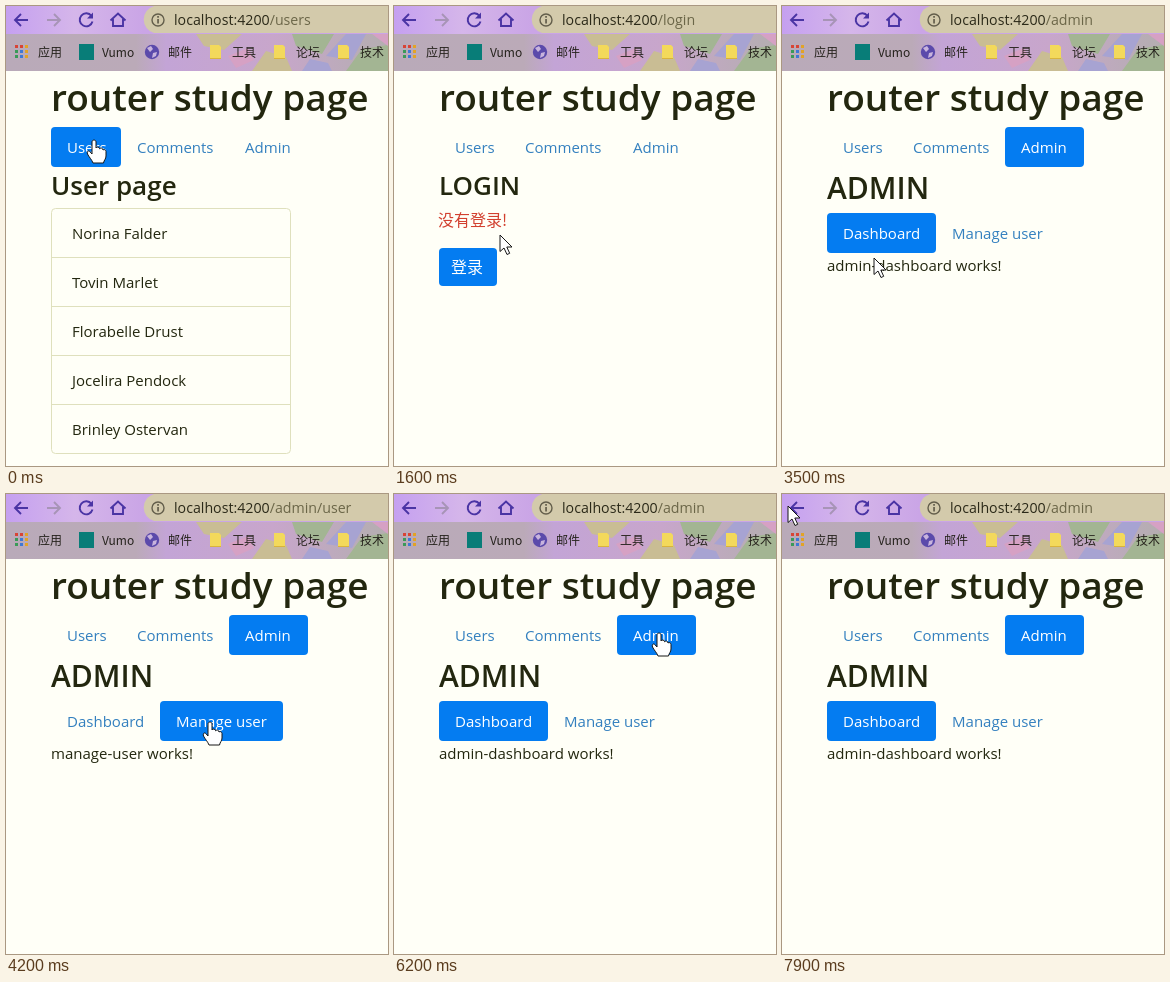
An HTML page for the animation above (8000 ms loop, 382 px wide and 460 px high).

```html
<!DOCTYPE html>
<html lang="en">
<head>
<meta charset="utf-8">
<title>router study page</title>
<style>
html, body { margin: 0; width: 100%; height: 100%; overflow: hidden; background: #fffff7; }
svg { display: block; width: 100vw; height: 100vh; }
text { font: 15px "Open Sans", "Noto Sans CJK SC", "Noto Sans CJK", sans-serif; fill: #23270f; white-space: pre; }
.h1 { font-size: 37px; font-weight: 600; }
.h2 { font-size: 30px; font-weight: 600; }
.h3 { font-size: 26px; font-weight: 600; }
.url { font-size: 14.2px; fill: #6b6648; }
.url .host { fill: #2b2918; }
.mark { font: 12px "Noto Sans CJK SC", "Noto Sans CJK", "Open Sans", sans-serif; fill: #25221c; }
.cn { font-size: 16px; font-family: "Noto Sans CJK SC", "Noto Sans CJK", sans-serif; }
.red { fill: #d2402f; }
.link { fill: #3480bf; }
.link.hover { fill: #17568f; }
.on { fill: #fff; }
.pill { fill: #047cf1; }
.line { fill: none; stroke: #dfe0bd; }
.icon { fill: none; stroke: #4a34a4; stroke-width: 1.9; }
</style>
</head>
<body>
<svg viewBox="0 0 382 460" preserveAspectRatio="none">
  <defs>
    <linearGradient id="top"><stop offset="0" stop-color="#c5a0f0"/><stop offset=".18" stop-color="#d5b6ea"/><stop offset=".36" stop-color="#caa5e6"/></linearGradient>
    <linearGradient id="bar"><stop offset="0" stop-color="#b9aab9"/><stop offset=".34" stop-color="#bbaab8"/><stop offset=".42" stop-color="#c3a4d6"/><stop offset=".7" stop-color="#c8a6cb"/><stop offset="1" stop-color="#b4aeb0"/></linearGradient>
  </defs>
  <rect width="382" height="460" fill="#fffff7"/>
  <g id="chrome">
    <rect width="382" height="30" fill="url(#top)"/>
    <rect y="28" width="382" height="37" fill="url(#bar)"/>
    <path d="M190 28h46l-18 16-20-4zM246 65l14-20 20 6 6 14z" fill="#c9bd94"/>
    <path d="M286 28h42l-12 20-26-8zM340 65l16-22 26-4v26z" fill="#a3b593"/>
    <path d="M320 50l20-22h20l-14 26zM296 65l8-12 18 4 4 8z" fill="#a7a3d2"/>
    <path d="M366 28h16v12zM222 50l20-8 6 12-18 8z" fill="#d6a1c4"/>
    <path d="M382 0H148a14 14 0 0 0 0 27H382z" fill="#d3caab"/>
    <path class="icon" d="M22 14H9.500M15 8L9 14l6 6"/>
    <path class="icon" d="M41 14h12.500M48 8l6 6-6 6" style="stroke:#a794b6"/>
    <path class="icon" d="M85.500 10A6.500 6.500 0 1 0 86.500 15.500"/>
    <path d="M87 6.500v6h-6z" fill="#4a34a4"/>
    <path class="icon" d="M104.500 14.500l7.500-7 7.500 7M107 13v7h10v-7"/>
    <circle class="icon" cx="152" cy="14" r="6" style="stroke:#635e4b;stroke-width:1.400"/>
    <path d="M151.200 10h1.700v1.700h-1.700zM151.200 13h1.700v4.500h-1.700z" fill="#635e4b"/>
    <rect x="73" y="38" width="15" height="16" fill="#087d78"/>
    <circle cx="146" cy="46" r="7.200" fill="#5b4aab"/>
    <path d="M141 42l4-2 2 3-3 3zM147 47l4-1-1 4-4 2z" fill="#c8b4dd"/>
  </g>
  <text class="url" x="168" y="19"><tspan class="host">localhost:4200</tspan><tspan id="path"></tspan></text>
  <text class="h1" x="45" y="105">router study page</text>
  <g id="page"></g>
  <g id="cursor" stroke-linejoin="round">
    <path id="arrow" d="M0 0V16.500L4 13l3 6.500 2.700-1.200L6.800 12H12z" fill="#fff" stroke="#161616"/>
    <path id="hand" d="M-2 1.500C-2-.7 2-.7 2 1.500V8C3-.2+8 6 7.500 6 9C7 7.300 9.300 8 9.300 10C10.300 9 12 9.700 12 11.500V16C12 19 10 20 9.500 23H-1C-2 20-5 17-7 13.500C-8 11-5 10-3.800 12L-2 14z" fill="#fff" stroke="#161616"/>
  </g>
</svg>
<script>
const $ = id => document.getElementById(id);
const LOOP = 8000, STEP = 100;

const nav = [["Users", 45, 70], ["Comments", 115, 108], ["Admin", 223, 79]];
const sub = [["Dashboard", 45, 109], ["Manage user", 154, 123]];
const people = ["Norina Falder", "Tovin Marlet", "Florabelle Drust", "Jocelira Pendock", "Brinley Ostervan"];
const notes = ["id labore ex et quam laborum", "quo vero reiciendis velit similique earum",
  "odio adipisci rerum aut animi", "alias odio sit", "vero eaque aliquid doloribus et culpa"];

const views = {
  users: { path: "/users", tab: 0, body: () => list("User page", people, 240) },
  comments: { path: "/comments", tab: 1, body: () => list("Comment page", notes, 400) },
  login: { path: "/login", tab: -1, body: p => login("没有登录!", false, p) },
  wait: { path: "/login", tab: -1, body: p => login("登录中 ...", true, p) },
  admin: { path: "/admin", tab: 2, body: p => admin(0, "admin-dashboard works!", p) },
  manage: { path: "/admin/user", tab: 2, body: p => admin(1, "manage-user works!", p) }
};

// [time, view]
const route = [[0, "users"], [700, "login"], [2600, "wait"], [3500, "admin"], [4100, "manage"],
  [4800, "comments"], [5400, "users"], [6200, "admin"], [6700, "manage"], [7100, "admin"]];

// [time, x, y] of the pointer tip
const track = [[0, 88, 134], [100, 88, 134], [600, 262, 141], [900, 262, 141], [1600, 106, 229],
  [1900, 106, 229], [2400, 92, 252], [3500, 92, 252], [4000, 204, 228], [4300, 204, 228],
  [4700, 168, 143], [4900, 168, 143], [5300, 101, 146], [5400, 92, 144], [5600, 92, 144],
  [6000, 265, 139], [6400, 265, 139], [6650, 220, 230], [6800, 220, 230], [7050, 102, 230],
  [7300, 102, 230], [7900, 6, 12], [8000, 6, 12]];

const text = (s, x, y, cls = "") => `<text class="${cls}" x="${x}" y="${y}">${s}</text>`;
const box = (x, y, w, h, attr) => `<rect x="${x}" y="${y}" width="${w}" height="${h}" rx="4" ${attr}/>`;
const inside = ([px, py], x, y, w, h) => px >= x && px < x + w && py >= y && py < y + h;

function pills(items, y, active, p) {
  return items.map(([label, x, w], i) => {
    const on = i === active;
    const cls = on ? "on" : inside(p, x, y, w, 40) ? "link hover" : "link";
    return (on ? box(x, y, w, 40, 'class="pill"') : "") + text(label, x + 16, y + 26, cls);
  }).join("");
}

function list(title, rows, w) {
  let out = text(title, 45, 189, "h3") + box(45.5, 202.5, w - 1, 245, 'class="line"');
  rows.forEach((row, i) => {
    const y = 202.5 + i * 49;
    if (i) out += `<path class="line" d="M45 ${y}h${w}"/>`;
    out += text(row, 66, 233 + i * 49);
  });
  return out;
}

function login(message, busy, p) {
  const dark = busy || inside(p, 45, 242, 58, 38);
  return text("LOGIN", 45, 189, "h3") + text(message, 44, 220, "cn red") +
    (busy ? box(42.5, 239.5, 63, 43, 'fill="#98d2ee"') : "") +
    box(45, 242, 58, 38, `fill="${dark ? "#0670b4" : "#047cf1"}"`) + text("登录", 57, 267, "cn on");
}

function admin(active, message, p) {
  return text("ADMIN", 45, 193, "h2") + pills(sub, 207, active, p) + text(message, 45, 265);
}

function pointer(t) {
  const i = track.findIndex(k => k[0] > t);
  const [t0, x0, y0] = track[i - 1], [t1, x1, y1] = track[i];
  const u = (t - t0) / (t1 - t0), e = u * u * (3 - 2 * u);
  return [x0 + (x1 - x0) * e, y0 + (y1 - y0) * e].map(Math.round);
}

function overLink(name, p) {
  const hit = (items, y) => items.some(([, x, w]) => inside(p, x, y, w, 40));
  if (hit(nav, 121)) return true;
  if (views[name].tab === 2) return hit(sub, 207);
  return views[name].tab < 0 && inside(p, 45, 242, 58, 38);
}

function bookmarks() {
  const labels = [["应用", 32], ["Vumo", 96], ["邮件", 162], ["工具", 226], ["论坛", 290], ["技术", 354]];
  const dots = ["#d84436", "#d84436", "#e2a326", "#3b9a58", "#3f78d5", "#e2a326", "#3b9a58", "#3f78d5", "#e2a326"];
  let out = labels.map(([s, x]) => text(s, x, 51, "mark")).join("");
  dots.forEach((c, i) => {
    out += `<rect x="${9 + i % 3 * 5}" y="${39 + Math.floor(i / 3) * 5}" width="3" height="3" fill="${c}"/>`;
  });
  for (const x of [204, 268, 332])
    out += `<path d="M${x} 39h9l2 2v12h-11z" fill="#f3d95b"/><path d="M${x} 52.500h11" stroke="#d9b43c"/>`;
  $("chrome").insertAdjacentHTML("beforeend", out);
}

let shown = "";
function draw(ms) {
  const t = Math.floor(ms % LOOP / STEP) * STEP;
  const name = route.filter(r => r[0] <= t).pop()[1];
  const view = views[name], p = pointer(t);
  const html = pills(nav, 121, view.tab, p) + view.body(p);
  if (html !== shown) $("page").innerHTML = shown = html;
  $("path").textContent = view.path;
  const link = overLink(name, p);
  $("hand").style.display = link ? "" : "none";
  $("arrow").style.display = link ? "none" : "";
  $("cursor").setAttribute("transform", `translate(${p})`);
}

// Index finger, three knuckles, wrist and thumb
$("hand").setAttribute("d", "M-2 2C-2-.6 2-.6 2 2V8C2.500 6.500 5.500 6.700 5.700 8.800C6.500 7.500 9 8 9 10C10 9 12 9.800 12 11.500V16C12 19 10 20 9.500 23H-1C-2 20-5 17-6.500 14C-7.500 11-5 10-3.800 12L-2 14z");
bookmarks();
const start = performance.now();
function tick(now) {
  draw(Math.max(0, now - start));
  requestAnimationFrame(tick);
}
draw(0);
requestAnimationFrame(tick);
</script>
</body>
</html>
```
